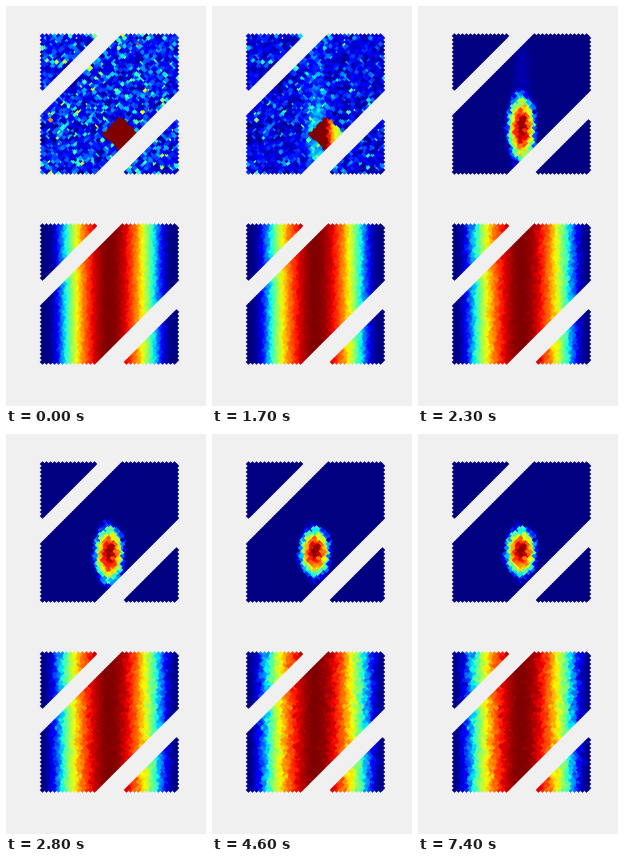
Recreate the animation shown at these times as a matplotlib script. Size 200 by 400 pixels, loop 7.6 s.

```python
import numpy as np
import matplotlib.pyplot as plt
from matplotlib.animation import FuncAnimation
from matplotlib.collections import PolyCollection

W, H, DPI = 200, 400, 100
FRAMES, STEP_MS, HOLD = 76, 100, 15
PANEL_SHIFT = 190
HALF = 2.8          # half diagonal of one cell; neighbours overlap

rng = np.random.default_rng(7)


def lattice():
    """Staggered cell centres, cut by two diagonal gaps, in random paint order."""
    i, j = np.meshgrid(np.arange(68), np.arange(69))
    x, y = 36.5 + 2 * i, 30.0 + 2 * j
    s = x + y
    inside = (s < 119) | ((s > 146) & (s < 256)) | (s > 286)
    keep = inside & ((i + j) % 2 == 0)
    return rng.permutation(np.column_stack([x[keep], y[keep]]))


pts = lattice()
x, y = pts.T
speckle = rng.gamma(2, 0.085, len(x))
grain = rng.normal(0, 1, len(x))
block = np.abs(x - 113) + np.abs(y - 128) <= 18


def decay(n, span, power=1):
    return np.exp(-(n / span) ** power)


def dome(r):
    """Parabolic cap with a soft foot at r = 1."""
    return np.log1p(np.exp(10 * (1 - r * r))) / 10


def top_field(n):
    grow = 1 - decay(n, 2.8, 4)
    cx, cy = 103 + 3 * decay(n, 5), 118 + 11 * decay(n, 8)
    rx, ry = 17.4 - 3 * decay(n, 10), 27.5 + 42 * decay(n, 6)
    r = np.hypot((x - cx) / rx, (y - cy) / ry)
    spot = dome(r + 0.05 * grain)

    width = 5 + y / 25
    plume = np.exp(-((x - 104 + grain) / width) ** 2) * np.clip((y + 20) / 80, 0, 1)
    tail = 0.48 * decay(n, 6, 3) * plume

    # the block fades fastest away from the column axis
    remnant = decay(n, 5, 4) * np.exp(-(n * (x - 104) / 60) ** 2)
    rest = np.where(block, remnant, decay(n, 3.2, 2) * speckle)
    return grow * np.maximum(spot, tail) + rest


def bottom_field(n):
    jitter = 1.6 - 1.2 * decay(n, 12)
    return dome((np.abs(x - 103.7) + jitter * grain) / (60 - 5 * decay(n, 8)))


def fields(frame):
    n = max(0, frame - HOLD)
    return np.clip(np.concatenate([top_field(n), bottom_field(n)]), 0, 1)


fig = plt.figure(figsize=(W / DPI, H / DPI), dpi=DPI, facecolor="#f0f0f0")
ax = fig.add_axes([0, 0, 1, 1])
ax.set_xlim(0, W)
ax.set_ylim(H, 0)
ax.axis("off")

diamond = HALF * np.array([[-1, 0], [0, -1], [1, 0], [0, 1]])
centres = np.vstack([pts, pts + [0, PANEL_SHIFT]])
cells = PolyCollection(centres[:, None, :] + diamond, cmap="jet",
                       edgecolors="none", linewidths=0)
cells.set_clim(0, 1)
cells.set_array(fields(0))
ax.add_collection(cells, autolim=False)


def update(frame):
    cells.set_array(fields(frame))
    return (cells,)


anim = FuncAnimation(fig, update, frames=FRAMES, interval=STEP_MS,
                     repeat=True, repeat_delay=0, blit=False)
plt.show()
```
